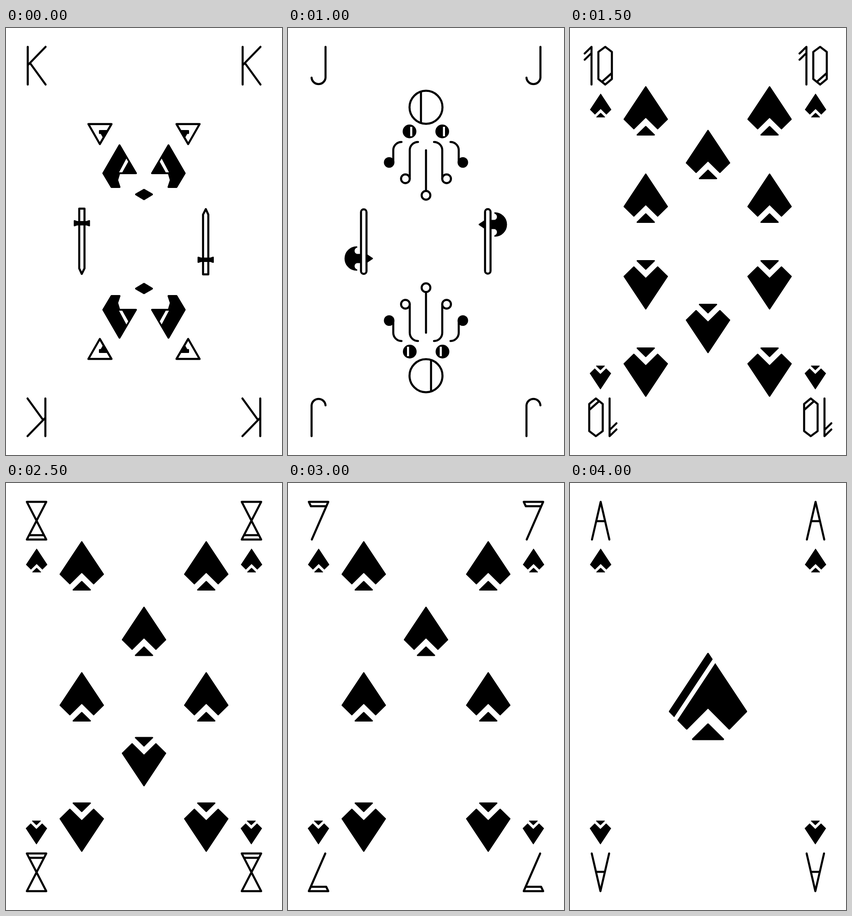
An HTML page that plays this animation: 603x929 px, repeating every 4500 ms.

```html
<!DOCTYPE html>
<html lang="en">
<head>
<meta charset="utf-8">
<title>Spades</title>
<style>
  html, body { margin: 0; width: 100%; height: 100%; overflow: hidden; background: #fff; }
  svg { display: block; width: 100%; height: 100%; }
  .card { visibility: hidden; }
  .card.on { visibility: visible; }
  .line { fill: none; stroke: #000; stroke-width: 4.5; stroke-linecap: round; stroke-linejoin: round; }
  .solid { fill: #000; stroke: #000; stroke-width: 4; stroke-linejoin: round; }
  .soft { fill: #000; stroke: #000; stroke-width: 3; stroke-linejoin: round; }
  .open { fill: #fff; stroke: #000; stroke-width: 4.5; stroke-linejoin: round; }
  .white { fill: #fff; }
</style>
</head>
<body>
<svg id="stage" viewBox="0 0 603 929"></svg>
<script>
const LEFT = 165.5, MID = 301.5, RIGHT = 437.5, HEIGHT = 929, CARD_MS = 500;

const path = (d, cls = "line") => `<path class="${cls}" d="${d}"/>`;
const circle = (x, y, r, cls) => `<circle class="${cls}" cx="${x}" cy="${y}" r="${r}"/>`;
const group = (transform, content) => `<g transform="${transform}">${content}</g>`;
const turned = (content, cx = MID) => content + group(`rotate(180 ${cx} ${HEIGHT / 2})`, content);
const mirrored = content => content + group(`translate(${2 * MID} 0) scale(-1 1)`, content);

const spadeShape = path("M0 2.5L47 73L26 93.5L0 68L-26 93.5L-47 73ZM0 89L18.5 107H-18.5Z", "soft");

// A negative y is the tip of an upside-down spade measured from the bottom edge.
const spade = ([x, y]) => y < 0
  ? group(`translate(${x} ${HEIGHT + y}) scale(1 -1)`, spadeShape)
  : group(`translate(${x} ${y})`, spadeShape);
const pair = (y, right = RIGHT) => [[LEFT, y], [right, y]];

const rankPaths = {
  K: "M47.5 41V123M86.5 41L48 80.5M53 77L86.5 123",
  Q: "M51.5 56.3A15.3 15.3 0 0 1 82 56.3V107.7A15.3 15.3 0 0 1 51.5 107.7ZM67 104L82 122",
  J: "M82 41V108A15.3 15.3 0 0 1 51.5 108",
  10: "M47 123V41L32 55.5M47 54.5L32 69M77 41L91.5 52V111L77 123L62 111V52ZM70 117L91.5 98",
  9: "M56 123L87 41H47.5L71 81M52 50.5H83",
  8: "M45.5 41H88L45.5 123H88ZM51 113.5H83",
  7: "M45.5 41H88L52 123M45.5 41L50 50.5H83",
  6: "M78 41L47.5 123H87L63.5 83M51 113.5H82",
  A: "M48 123L67 41L86 123M57.5 83H76.5"
};

function corners(rank, withSuit) {
  const suit = withSuit ? group("translate(67 142.5) scale(.48)", spadeShape) : "";
  const mark = path(rankPaths[rank]) + suit;
  return turned(mark + group("translate(469.5 0)", mark));
}

function king() {
  const side = path("M180 209H230.5L205 252.5Z")
    + path("M204.5 223.5H221L213 238L208 229H204.5Z", "soft")
    + path("M248 255L284 316H247.5L243 331L248 346H230.5L212.5 316Z", "solid")
    + path("M263 284L267 291L254 314H247Z", "white");
  const nose = path("M301.5 352L319 362L301.5 372.5L284 362Z", "solid");
  const sword = path("M160 393H171.5V523L165.5 535L160 523Z", "open")
    + path("M149.5 419.5L155 421.5H176L182 419.5V430L176 428H155L149.5 430Z", "soft");
  return turned(mirrored(side) + nose) + turned(sword, 301);
}

function queen() {
  const side = path("M266 206V184A18 18 0 0 1 284 166")
    + path("M230 292V230A18 18 0 0 1 248 212")
    + circle(230, 303, 9.5, "open")
    + path("M244 256Q266 230 288 256Q266 282 244 256Z", "solid")
    + path("M264 245H269V267H264Z", "white");
  const middle = circle(301.5, 166, 9.5, "open") + path("M301.5 266V318")
    + path("M301.5 352L319 362L301.5 372.5L284 362Z", "solid");
  const flower = path("M165.5 426V535M165.5 500Q148 498 148 480Q165.5 482 165.5 500")
    + circle(165.5, 410, 16, "open") + circle(165.5, 410, 6, "solid");
  return turned(mirrored(side) + middle) + turned(flower, 301);
}

function jack() {
  const eye = x => circle(x, 225, 15, "") + path(`M${x + 1.5} 215h4.5v20.5h-4.5Z`, "white");
  const arms = circle(221, 292.5, 11.5, "") + path("M230 292V266A18 18 0 0 1 248 248")
    + path("M266 328V266A18 18 0 0 1 284 248") + circle(256.5, 328, 9.5, "open");
  const head = circle(MID, 172.5, 36, "line") + path("M290.5 140V205")
    + eye(265.5) + eye(337)
    + path("M301.5 266V354") + circle(MID, 364, 9.5, "open");
  const axe = path("M150 476.5A25 25 0 0 0 150 526.5C142 523 142 513 150 510H160V493H150C142 490 142 480 150 476.5Z", "soft")
    + path("M172 493.5L184 501.5L172 509.5Z", "soft")
    + `<rect class="open" x="159.5" y="394.5" width="12" height="140.5" rx="6"/>`;
  return turned(head + mirrored(arms)) + turned(axe, 301);
}

const ace = () =>
  path("M301.5 371.5L385 497L348 534.5L301.5 488L255 534.5L218 497ZM301.5 525L334.5 557.5H268.5Z", "solid")
  + `<path d="M321 378L225 522" stroke="#fff" stroke-width="9.4"/>`;

const pips = list => list.map(spade).join("");
const rowY = { outer: 125.5, center: 410.5, inner: 268, upper: 315.5, tenInner: 220.5 };
const six = [...pair(rowY.outer), ...pair(rowY.center), ...pair(-rowY.outer)];
const eightColumns = [rowY.outer, rowY.upper, -rowY.upper, -rowY.outer].flatMap(y => pair(y, 436));

const cards = [
  corners("K") + king(),
  corners("Q") + queen(),
  corners("J") + jack(),
  corners("10", true) + pips([...eightColumns, [MID, rowY.tenInner], [MID, -rowY.tenInner]]),
  corners("9", true) + pips([...eightColumns, [MID, rowY.center]]),
  corners("8", true) + pips([...six, [MID, rowY.inner], [MID, -rowY.inner]]),
  corners("7", true) + pips([...six, [MID, rowY.inner]]),
  corners("6", true) + pips(six),
  corners("A", true) + ace()
];

const stageElement = document.getElementById("stage");
stageElement.innerHTML = cards.map(card => `<g class="card">${card}</g>`).join("");

function draw(now) {
  const current = Math.floor(now / CARD_MS) % cards.length;
  [...stageElement.children].forEach((card, i) => card.classList.toggle("on", i === current));
  requestAnimationFrame(draw);
}
draw(performance.now());
</script>
</body>
</html>
```
